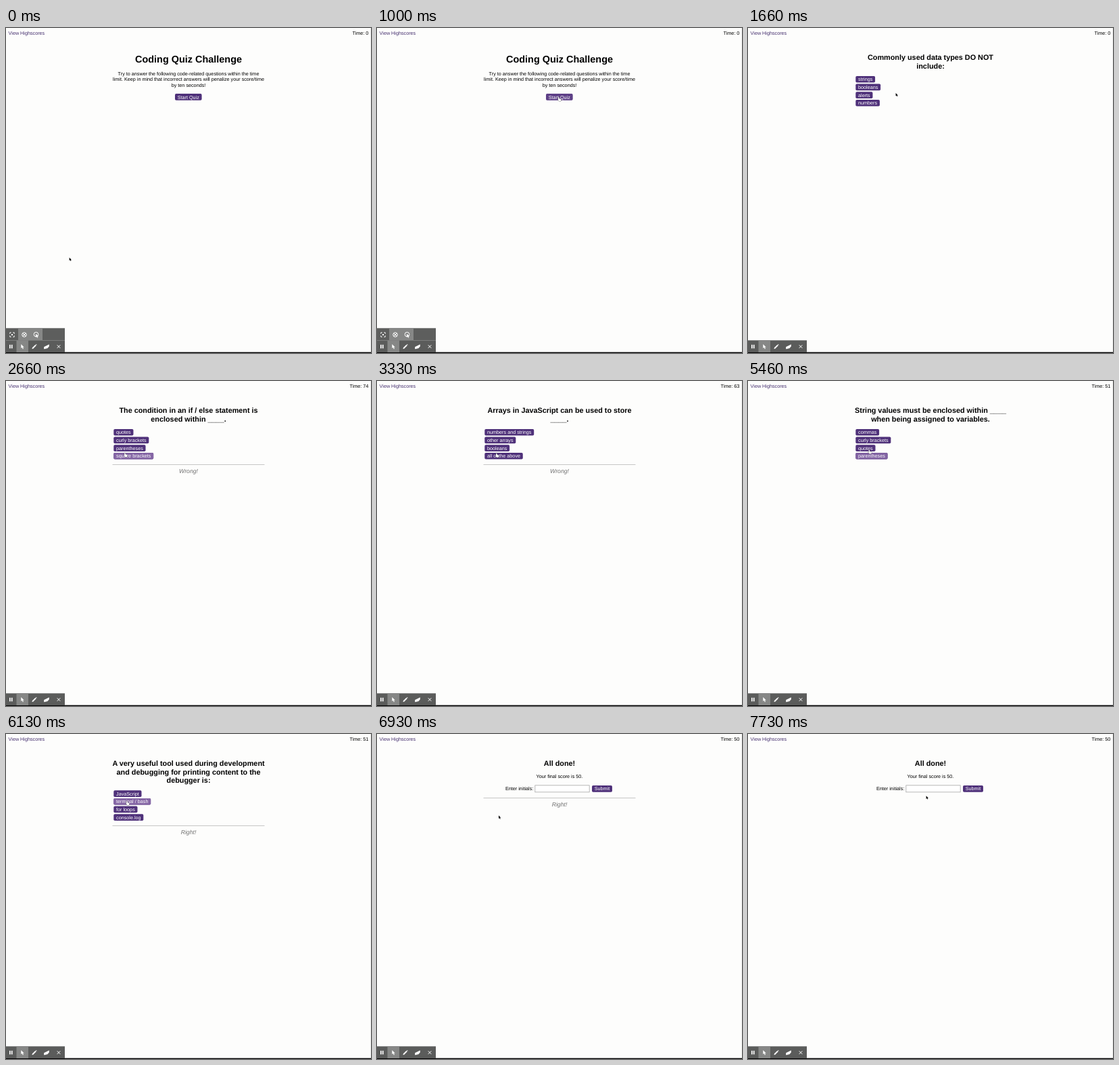
An HTML page with a canvas that plays this animation: 540x480 px, repeating every 8 s.

```html
<!DOCTYPE html>
<html lang="en">
<head>
<meta charset="utf-8">
<title>Coding Quiz Challenge</title>
<style>
html, body { margin: 0; width: 100%; height: 100%; overflow: hidden; background: #fdfdfc; }
canvas { display: block; }
</style>
</head>
<body>
<canvas id="stage" width="540" height="480"></canvas>
<script>
const ctx = document.getElementById('stage').getContext('2d');
const LOOP = 8000, EM = 7.22, FADE = 250;
const PURPLE = '#4f317a', LIGHT = '#8566a5';

// hover entries: [answer index, enter time, leave time]
const screens = [
  { at: 0, draw: drawIntro },
  { at: 1190, title: ['Commonly used data types DO NOT', 'include:'],
    answers: ['strings', 'booleans', 'alerts', 'numbers'], hover: [[3, 1800, 9000]] },
  { at: 2330, title: ['The condition in an if / else statement is', 'enclosed within ____.'],
    answers: ['quotes', 'curly brackets', 'parentheses', 'square brackets'],
    hover: [[3, 2380, 9000]], message: 'Wrong!', until: 3090 },
  { at: 3270, title: ['Arrays in JavaScript can be used to store', '____.'],
    answers: ['numbers and strings', 'other arrays', 'booleans', 'all of the above'],
    hover: [[3, 4000, 9000]], message: 'Wrong!', until: 4000 },
  { at: 4400, title: ['String values must be enclosed within ____', 'when being assigned to variables.'],
    answers: ['commas', 'curly brackets', 'quotes', 'parentheses'],
    hover: [[3, 4450, 5445], [2, 5445, 9000]], message: 'Right!', until: 5150 },
  { at: 5860, title: ['A very useful tool used during development', 'and debugging for printing content to the', 'debugger is:'],
    answers: ['JavaScript', 'terminal / bash', 'for loops', 'console.log'],
    hover: [[1, 5880, 6350], [2, 6350, 6450], [3, 6450, 9000]], message: 'Right!', until: 6610 },
  { at: 6870, draw: drawEnd, message: 'Right!', until: 7620 }
];
const clock = [[0, 0], [2200, 74], [3200, 63], [4200, 52], [5200, 51], [6200, 50]];
const pointerPath = [
  [0, 93.7, 339], [60, 93.7, 339], [860, 269, 102], [1190, 268, 102], [1660, 218.6, 96],
  [1730, 195, 102], [2060, 176, 109], [2660, 175.6, 106], [4060, 177.4, 107.5],
  [5390, 178, 108], [5460, 179, 101.5], [5660, 179, 99.5], [6130, 178.6, 99],
  [6250, 178.6, 99], [6660, 180, 120], [7330, 180, 121], [7690, 263.6, 91.3], [8000, 263.6, 91.3]
];

const clamp = v => Math.max(0, Math.min(1, v));
const latest = (list, t, time) => list.filter(item => time(item) <= t).pop();

function text(str, x, y, { size = EM, style = '', align = 'left', color = '#000' } = {}) {
  ctx.font = `${style} ${size}px "Liberation Sans", Arial, sans-serif`;
  ctx.textAlign = align;
  ctx.fillStyle = color;
  ctx.fillText(str, x, y);
}

function rect(x, y, w, h, color) {
  ctx.fillStyle = color;
  ctx.fillRect(x, y, w, h);
}

function heading(lines) {
  lines.forEach((line, i) =>
    text(line, 270, 47.2 + i * 12.4, { size: EM * 1.5, style: 'bold', align: 'center' }));
}

function button(label, x, y, glow = 0) {
  ctx.font = `${EM}px "Liberation Sans", Arial, sans-serif`;
  ctx.beginPath();
  ctx.roundRect(x, y, ctx.measureText(label).width + 7.5, 9.7, 1.8);
  ctx.fillStyle = PURPLE;
  ctx.fill();
  ctx.globalAlpha = glow;
  ctx.fillStyle = LIGHT;
  ctx.fill();
  ctx.globalAlpha = 1;
  text(label, x + 3.75, y + 7.4, { color: '#fff' });
}

const glowAt = (t, enter, leave) => clamp((t - enter) / FADE) - clamp((t - leave) / FADE);

function drawIntro(t) {
  text('Coding Quiz Challenge', 270, 50.6, { size: EM * 2, style: 'bold', align: 'center' });
  ['Try to answer the following code-related questions within the time',
   'limit. Keep in mind that incorrect answers will penalize your score/time',
   'by ten seconds!'
  ].forEach((line, i) => text(line, 270, 70.3 + i * 8.15, { align: 'center' }));
  button('Start Quiz', 250, 97.1, glowAt(t, 930, 9000));
  return 107;
}

function drawEnd() {
  heading(['All done!']);
  text('Your final score is 50.', 270, 65.3, { align: 'center' });
  text('Enter initials:', 190, 83.3);
  rect(233.5, 75.5, 81, 10.7, '#999');
  rect(234.2, 76.2, 79.6, 9.3, '#fff');
  button('Submit', 318, 76);
  return 87;
}

function drawQuestion(screen, t) {
  heading(screen.title);
  const top = 46.2 + screen.title.length * 12.35;
  screen.answers.forEach((answer, i) => {
    const glow = screen.hover.filter(h => h[0] === i)
      .reduce((sum, h) => sum + glowAt(t, h[1], h[2]), 0);
    button(answer, 159.3, top + i * 11.67, glow);
  });
  return top + 44.7;
}

function icon(x, y, path, filled) {
  ctx.save();
  ctx.translate(x, y);
  ctx.fillStyle = ctx.strokeStyle = '#fff';
  ctx.lineWidth = 1;
  const shape = new Path2D(path);
  filled ? ctx.fill(shape) : ctx.stroke(shape);
  ctx.restore();
}

const ARROW = 'M0 0V4.6L1.1 3.7L1.9 5.3L2.7 4.9L1.9 3.4H3.3Z';
const HAND = 'M1.2 0Q2 0 2 .8V2.2L4.3 2.8Q5 3 4.9 3.8L4.5 6H1.6L-.2 3.8Q-.1 3 .6 3.5V.7Q.6 0 1.2 0Z';
const RING = 'M3.3 0A3.3 3.3 0 1 1 -3.3 0A3.3 3.3 0 1 1 3.3 0';

function toolbar(expanded) {
  if (expanded) {
    rect(0, 443.3, 87, 18, '#5d5e5d');
    rect(18, 443.3, 36, 18, '#868786');
    icon(9, 453, 'M-3.2 -1.3V-3.2H-1.3M1.3 -3.2H3.2V-1.3M3.2 1.3V3.2H1.3M-1.3 3.2H-3.2V1.3');
    icon(9, 453, 'M-1 -1H1V1H-1Z', true);
    icon(27, 453, RING + 'M-2 -2L2 2M2 -2L-2 2');
    icon(44.5, 452.5, RING);
    icon(44, 451.5, 'M0 0V5.5L1.4 4.3L2.3 6.2L3.3 5.7L2.4 4H4Z', true);
  }
  rect(0, 461.3, 87, 17.7, '#5b5c5b');
  rect(15.5, 461.3, 17.5, 17.7, '#868786');
  icon(7.3, 470.5, 'M-2.3 -2.7H-.6V2.7H-2.3ZM.6 -2.7H2.3V2.7H.6Z', true);
  icon(22.3, 467, 'M0 0V6L1.5 4.8L2.5 7.2L3.6 6.7L2.6 4.4H4.5Z', true);
  icon(42, 470.5, 'M-3.6 3.6L-3 1.6L1.4 -2.8L2.8 -1.4L-1.6 3ZM1.9 -3.3L2.5 -3.8L3.8 -2.5L3.3 -1.9Z', true);
  icon(60, 470.5, 'M-3.8 .4L3.8 -3.2V-.3L1.4 2.4L-3.8 3.8Z', true);
  icon(78, 470.5, 'M-2.3 -2.3L2.3 2.3M2.3 -2.3L-2.3 2.3');
}

function pointer(t) {
  const next = Math.max(1, pointerPath.findIndex(p => p[0] > t));
  const [t0, x0, y0] = pointerPath[next - 1], [t1, x1, y1] = pointerPath[next];
  const u = (t - t0) / (t1 - t0), k = u * u * (3 - 2 * u);
  const overButton = (t >= 930 && t < 1190) || (t >= 1800 && t < 6870);
  const shape = new Path2D(overButton ? HAND : ARROW);
  ctx.save();
  ctx.translate(x0 + (x1 - x0) * k - (overButton ? 1 : 0), y0 + (y1 - y0) * k);
  ctx.lineWidth = 0.6;
  ctx.strokeStyle = overButton ? '#222' : '#fff';
  ctx.fillStyle = overButton ? '#fff' : '#000';
  ctx.stroke(shape);
  ctx.fill(shape);
  ctx.restore();
}

function render(t) {
  rect(0, 0, 540, 480, '#fdfdfc');
  ctx.textRendering = 'geometricPrecision';
  text('View Highscores', 3.6, 10.1, { color: '#46306f' });
  text('Time: ' + latest(clock, t, c => c[0])[1], 536.3, 10.1, { align: 'right' });

  const screen = latest(screens, t, s => s.at);
  const bottom = screen.draw ? screen.draw(t) : drawQuestion(screen, t);
  if (t < screen.until) {
    const y = Math.round(bottom + 7.4);
    rect(157.5, y, 225, 1, '#c6c6c6');
    text(screen.message, 270, y + 12.6, { size: EM * 1.2, style: 'italic', align: 'center', color: '#707070' });
  }

  rect(539, 0, 1, 480, '#ececec');
  rect(0, 478.7, 540, 1.3, '#000');
  toolbar(t < 1500);
  pointer(t);
}

function frame(now) {
  render(now % LOOP);
  requestAnimationFrame(frame);
}
render(0);
requestAnimationFrame(frame);
</script>
</body>
</html>
```
